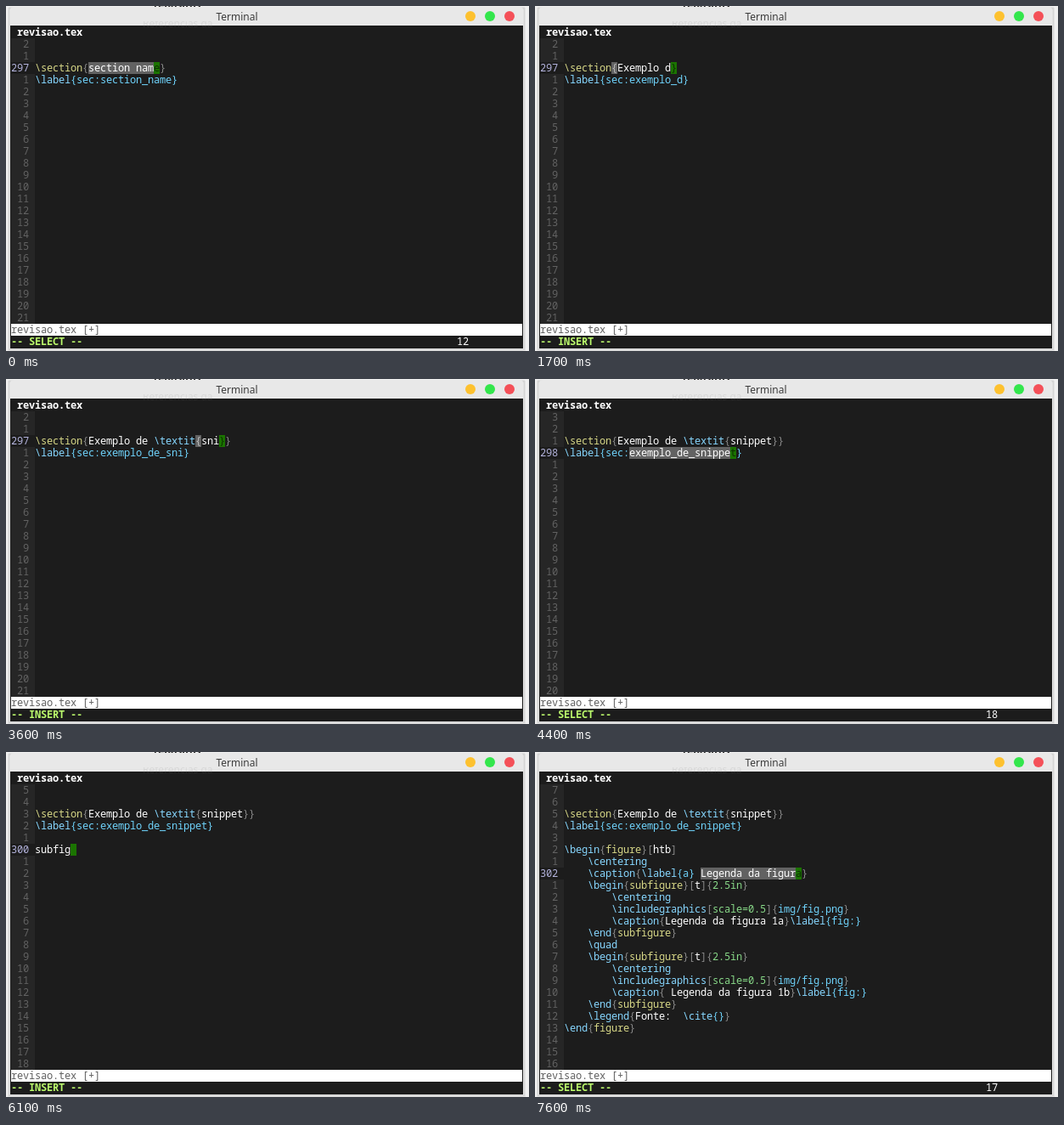
An HTML page that plays this animation: 616 px wide and 406 px high, repeating every 8 s.

```html
<!DOCTYPE html>
<html lang="pt">
<head>
<meta charset="utf-8">
<title>Terminal</title>
<style>
  html, body { margin: 0; width: 100%; height: 100%; overflow: hidden; background: #f0f0f0; }
  svg { display: block; width: 616px; height: 406px; }
  text { white-space: pre; }
  #screen { font: 12px "Noto Sans Mono", "DejaVu Sans Mono", monospace; }
  .ui { font: 12px "Noto Sans", sans-serif; }
  .b { font-weight: bold; }
</style>
</head>
<body>
<svg viewBox="0 0 616 406">
  <defs>
    <clipPath id="ghost"><rect x="150" y="18" width="100" height="8"/></clipPath>
  </defs>
  <rect width="616" height="406" fill="#f0f0f0"/>
  <g fill="none" stroke="#000" stroke-opacity=".06" stroke-width="2">
    <rect x="4" y="2" width="606" height="402"/>
    <rect x="3" y="3" width="608" height="402"/>
  </g>
  <text class="ui b" x="174" y="3" fill="#222">repositos</text>
  <path d="M5 403V5Q5 1 9 1H605Q609 1 609 5V403Z" fill="#e8e8e8"/>
  <rect x="5" y="23" width="604" height="380" fill="#1c1c1c"/>
  <text class="ui" x="161" y="25" fill="#808080" opacity=".14" clip-path="url(#ghost)">Referências da</text>
  <text class="ui" x="272" y="17" text-anchor="middle" fill="#3c3c3c">Terminal</text>
  <circle cx="547" cy="12" r="6" fill="#fdc12f"/>
  <circle cx="570" cy="12" r="6" fill="#33e64c"/>
  <circle cx="593" cy="12" r="6" fill="#f45058"/>
  <g id="screen"></g>
</svg>
<script>
const LOOP = 8000, CW = 7, CH = 14, LEFT = 6, TOP = 24, GUTTER = 4;
const WHITE = '#ffffff', GRAY = '#8a8a8a', GREEN = '#1b7400', SELECT = '#626262';
const TOKENS = /(\\section|(?<=\\(?:begin|end)\{)\w+)|((?<=\\(?:label|cite))\{[^{}]*\}|img\/fig\.png)|(\\[a-z]+)|(scale=0\.5|2\.5in)|([{}[\]])/g;
const COLORS = ['#d7d787', '#6fd3fb', '#87d7ff', '#87d787', GRAY];

const TITLE_KEYS = [600, 800, 900, 1000, 1100, 1300, 1400, 1500, 1700, 1800, 1800, 2700, 2800];
const WORD_KEYS = [3400, 3500, 3600, 3800, 3900, 4000, 4100];
const TRIGGER_KEYS = [5500, 5600, 5700, 5900, 6000, 6100];

const subfigure = caption => [
  '    \\begin{subfigure}[t]{2.5in}',
  '        \\centering',
  '        \\includegraphics[scale=0.5]{img/fig.png}',
  `        \\caption{${caption}}\\label{fig:}`,
  '    \\end{subfigure}'
];

const figure = label => [
  '\\begin{figure}[htb]',
  '    \\centering',
  `    \\caption{\\label{${label}} Legenda da figura}`,
  ...subfigure('Legenda da figura 1a'),
  '    \\quad',
  ...subfigure(' Legenda da figura 1b'),
  '    \\legend{Fonte:  \\cite{}}',
  '\\end{figure}'
];

const typed = (text, keys, t) => text.slice(0, keys.filter(k => t >= k).length);
const slug = text => text.toLowerCase().replace(/ /g, '_');
const heading = (title, name) => [`\\section{${title}}`, `\\label{sec:${slug(name)}}`];

// Editor contents at time t; lines start on screen row 3
function editor(t) {
  if (t < 600)
    return { lines: heading('section name', 'section name'), row: 3, from: 9, col: 20 };
  if (t < 3000) {
    const title = typed('Exemplo de it', TITLE_KEYS, t);
    return { lines: heading(title, title), row: 3, match: 8, col: 9 + title.length };
  }
  if (t < 4300) {
    const word = t < 3400 ? 'text' : typed('snippet', WORD_KEYS, t);
    const lines = heading(`Exemplo de \\textit{${word}}`, 'Exemplo de ' + word);
    if (t < 3100) return { lines, row: 3, busy: true };
    if (t < 3400) return { lines, row: 3, from: 28, col: 31 };
    return { lines, row: 3, match: 27, col: 28 + word.length };
  }
  const lines = heading('Exemplo de \\textit{snippet}', 'Exemplo de snippet');
  if (t < 4400) return { lines, row: 4, busy: true };
  if (t < 5100) return { lines, row: 4, from: 11, col: 28 };
  if (t < 6500) {
    const word = typed('subfig', TRIGGER_KEYS, t);
    return { lines: [...lines, '', word], row: 6, col: word.length };
  }
  const label = t < 7300 ? '' : 'a';
  const full = [...lines, '', ...figure(label)];
  return t < 7600
    ? { lines: full, row: 8, match: 19, col: 20 + label.length }
    : { lines: full, row: 8, from: 23, col: 39 };
}

const cellX = col => LEFT + col * CW;
const rowY = row => TOP + row * CH;

const block = (col, row, width, fill, height = 1) =>
  `<rect x="${cellX(col)}" y="${rowY(row)}" width="${width * CW}" height="${height * CH}" fill="${fill}"/>`;

function put(str, col, row, fill, cls = '') {
  const xs = [...str].map((_, i) => cellX(col + i)).join(' ');
  return `<text class="${cls}" x="${xs}" y="${rowY(row) + 11}" fill="${fill}">${str}</text>`;
}

function code(line, row) {
  let out = '', last = 0;
  const add = (str, at, fill) => {
    if (str.trim()) out += put(str, GUTTER + at, row, fill);
  };
  for (const m of line.matchAll(TOKENS)) {
    add(line.slice(last, m.index), last, WHITE);
    add(m[0], m.index, COLORS[m.slice(1).findIndex(Boolean)]);
    last = m.index + m[0].length;
  }
  add(line.slice(last), last, WHITE);
  return out;
}

function screen(t) {
  const { lines, row, from, col, match, busy } = editor(t);
  const selecting = from !== undefined;
  let out = block(0, 1, GUTTER, '#262626', 24) + block(0, row, GUTTER, '#1c1c1c');
  out += put('revisao.tex', 1, 0, WHITE, 'b');

  for (let r = 1; r <= 24; r++) {
    const here = r === row;
    const n = String(here ? 294 + row : Math.abs(r - row));
    out += put(n, 3 - n.length, r, here ? '#b3b3dc' : '#626262');
  }
  lines.forEach((line, i) => out += code(line, i + 3));

  const line = lines[row - 3];
  if (selecting) {
    out += block(GUTTER + from, row, col - from, SELECT);
    out += put(line.slice(from, col), GUTTER + from, row, WHITE);
  }
  if (match !== undefined) {
    out += block(GUTTER + match, row, 1, SELECT) + put('{', GUTTER + match, row, '#c0c0c0');
  }
  if (!busy) {
    out += block(GUTTER + col, row, 1, GREEN);
    if (line[col]) out += put(line[col], GUTTER + col, row, '#0c3000');
  }

  out += `<rect x="6" y="${rowY(25)}" width="602" height="${CH}" fill="#fff"/>`;
  out += put('revisao.tex [+]', 0, 25, '#5f5f5f');
  if (busy) out += block(0, 26, 1, GREEN);
  else out += put(selecting ? '-- SELECT --' : '-- INSERT --', 0, 26, '#bcfc6c', 'b');
  if (selecting) out += put(String(col - from + 1), 75, 26, WHITE);
  return out;
}

const view = document.getElementById('screen');
const start = performance.now();
let shown = '';

function draw(now) {
  const next = screen(Math.max(0, now - start) % LOOP);
  if (next !== shown) view.innerHTML = shown = next;
  requestAnimationFrame(draw);
}
draw(start);
</script>
</body>
</html>
```
